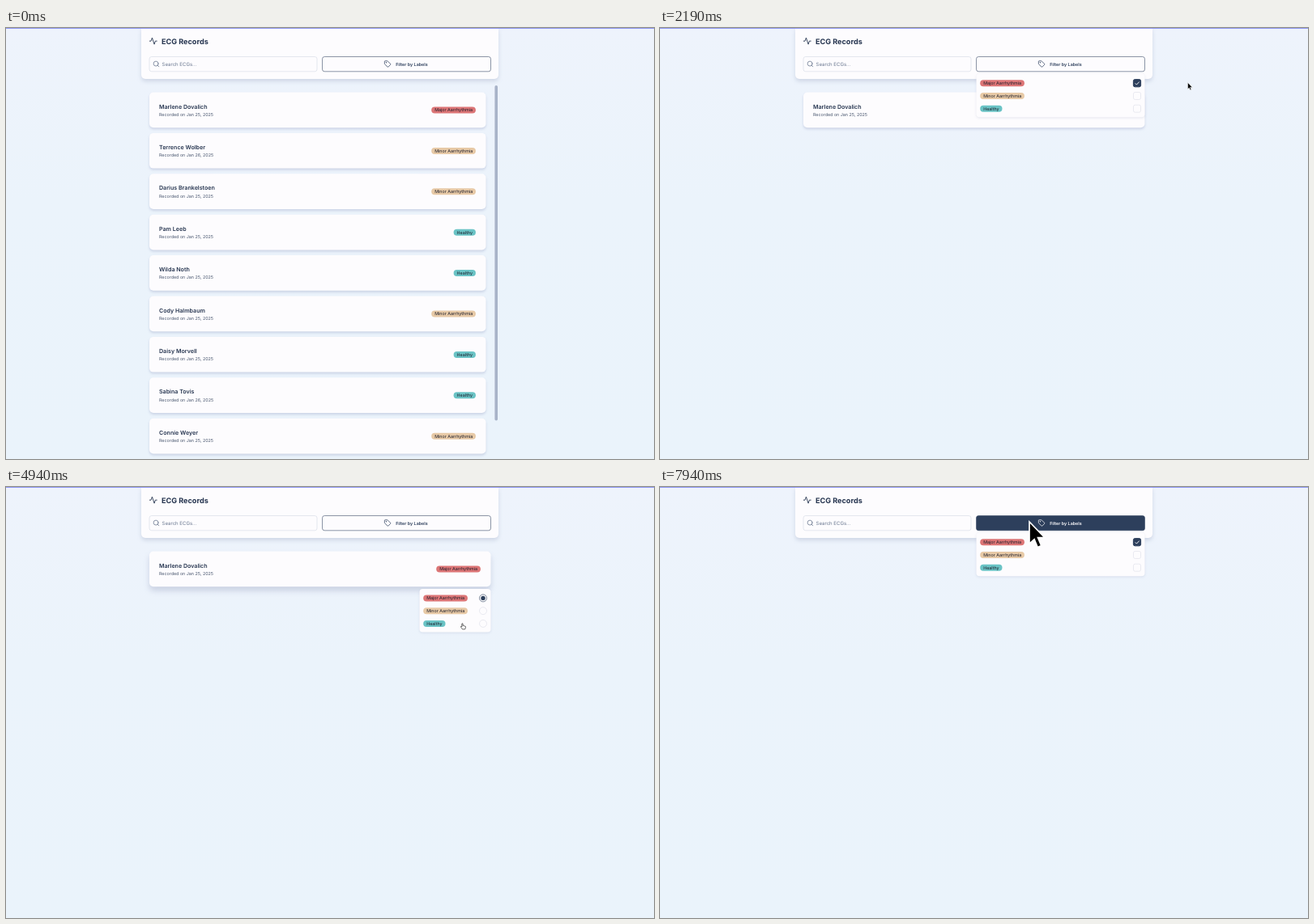
An HTML page that plays this animation: 800 by 533 pixels, repeating every 8000 ms.

```html
<!DOCTYPE html>
<html lang="en">
<head>
<meta charset="utf-8">
<title>ECG Records</title>
<style>
  html, body { margin: 0; width: 100%; height: 100%; overflow: hidden; background: #ebf3fb; }
  svg { display: block; width: 800px; height: 533px; }
  text { font-family: Inter, "Open Sans", sans-serif; text-rendering: geometricPrecision; fill: #25344f; }
  .title { font-size: 9.1px; font-weight: 700; }
  .name { font-size: 7.1px; font-weight: 600; }
  .date { font-size: 5.36px; fill: #48566e; }
  .pill { font-size: 5.36px; fill: #1c1d2a; }
  .hint { font-size: 6.05px; fill: #6b7890; }
  .action { font-size: 5.4px; font-weight: 600; }
  .icon { fill: none; stroke: #25344f; stroke-width: 2; stroke-linecap: round; stroke-linejoin: round; }
  .panel { fill: #fdfcfe; }
  .header { filter: drop-shadow(0 3px 2.6px rgba(80, 95, 140, .19)); }
  .card { filter: drop-shadow(0 2px 1.8px rgba(80, 90, 150, .2)); }
  .card.lifted { filter: drop-shadow(0 5px 3.6px rgba(80, 90, 140, .22)); }
  .menu { filter: drop-shadow(0 1px 1.5px rgba(80, 90, 140, .14)); }
  .box { fill: #fdfcfe; stroke: #dcdee8; stroke-width: .6; }
  .on { fill: #2d3f5c; stroke: #2d3f5c; }
</style>
</head>
<body>
<svg viewBox="0 0 800 533" id="stage"></svg>
<script>
const LOOP = 8000;
const NAVY = [45, 63, 92], LIGHT = [253, 252, 254];
const LABELS = {
  major: { name: "Major Aarrhythmia", width: 54.7, color: "#dc7576" },
  minor: { name: "Minor Aarrhythmia", width: 54.7, color: "#e7c9a6" },
  healthy: { name: "Healthy", width: 27.3, color: "#6ac3c5" }
};
const RECORDS = [
  ["Marlene Dovalich", "Jan 25", "major"], ["Terrence Wolber", "Jan 26", "minor"],
  ["Darius Brankelstoen", "Jan 25", "minor"], ["Pam Leeb", "Jan 25", "healthy"],
  ["Wilda Noth", "Jan 25", "healthy"], ["Cody Halmbaum", "Jan 25", "minor"],
  ["Daisy Morvell", "Jan 25", "healthy"], ["Sabina Tovis", "Jan 26", "healthy"],
  ["Connie Weyer", "Jan 25", "minor"]
];

// Areas that react to the pointer
const SEARCH = { x: 177, y: 35.5, w: 207, h: 18.3 };
const BUTTON = { x: 390.5, y: 35.5, w: 208, h: 18.3 };
const BADGE = { x: 531, y: 97.5, w: 55, h: 8 };
const FILTER_MENU = { x: 390.5, y: 56.8, w: 208, h: 53.5 };
const LABEL_MENU = { x: 510.5, y: 126, w: 88, h: 53.5 };

// Markup helpers
const rect = (x, y, w, h, r, attrs = "") =>
  `<rect x="${x}" y="${y}" width="${w}" height="${h}" rx="${r}" ${attrs}/>`;
const area = (a, r, attrs) => rect(a.x, a.y, a.w, a.h, r, attrs);
const text = (x, y, cls, value) => `<text x="${x}" y="${y}" class="${cls}">${value}</text>`;
const icon = (x, y, size, body, attrs = "") =>
  `<g class="icon" transform="translate(${x} ${y}) scale(${size / 24})" ${attrs}>${body}</g>`;

function pill(key, x, cy) {
  const { name, width, color } = LABELS[key];
  return rect(x, cy - 4, width, 8, 4, `fill="${color}"`) + text(x + 4, cy + 1.95, "pill", name);
}

function card([name, day, key], i, width) {
  const y = 79.5 + 50.4 * i;
  return rect(177, y, width, 43.7, 5, 'class="panel card"') +
    text(189, y + 20.1, "name", name) +
    text(189, y + 29.2, "date", `Recorded on ${day}, 2025`) +
    pill(key, 177 + width - 12.6 - LABELS[key].width, y + 22);
}

function menu(id, a, control) {
  const items = Object.keys(LABELS).map((key, i) => {
    const cy = a.y + 11.4 + 15.75 * i;
    return pill(key, a.x + 4.7, cy) + control(key, cy);
  });
  return `<g id="${id}">${area(a, 4, 'class="panel menu"')}${items.join("")}</g>`;
}

const tick = cy => `<g id="check">${rect(584.4, cy - 4.6, 9.2, 9.2, 2, 'class="on"')}
  <path d="M586.7 ${cy + .2}l1.7 1.7l3.2-3.5" fill="none" stroke="#fff" stroke-width=".9"/></g>`;
const checkbox = (key, cy) =>
  rect(584.5, cy - 4.5, 9, 9, 2, 'class="box"') + (key === "major" ? tick(cy) : "");
const radio = (key, cy) =>
  `<circle cx="589" cy="${cy}" r="4.5" class="box" id="ring-${key}"/>
   <circle cx="589" cy="${cy}" r="2.7" class="on" stroke-width="0" id="dot-${key}"/>`;

const PULSE = `<path d="M22 12h-4l-3 9L9 3l-3 9H2"/>`;
const LENS = `<circle cx="11" cy="11" r="8"/><path d="m21 21-4.3-4.3"/>`;
const TAG = `<path d="M12.6 2.6A2 2 0 0 0 11.2 2H4a2 2 0 0 0-2 2v7.2a2 2 0 0 0 .6 1.4l8.7 8.7a2.4 2.4 0 0 0 3.4 0l6.6-6.6a2.4 2.4 0 0 0 0-3.4z"/><circle cx="7.5" cy="7.5" r=".6"/>`;

document.getElementById("stage").innerHTML = `
  <defs><linearGradient id="sky" x2="0" y2="1">
    <stop stop-color="#eef3fc"/><stop offset=".4" stop-color="#ebf3fb"/><stop offset="1" stop-color="#eaf3fb"/>
  </linearGradient></defs>
  ${rect(0, 0, 800, 533, 0, 'fill="url(#sky)"')}
  <g id="all">${RECORDS.map((r, i) => card(r, i, 415.5)).join("")}
    ${rect(603.4, 71, 3.6, 414.5, 1.8, 'fill="#a8b3c8"')}</g>
  <g id="single">${card(RECORDS[0], 0, 421.5)}</g>
  <path class="panel header" d="M167 0H608V58a5 5 0 0 1-5 5H172a5 5 0 0 1-5-5z"/>
  ${rect(0, 0, 800, .8, 0, 'fill="#7a82f2"')}
  ${icon(176.4, 10.8, 10.7, PULSE)}
  ${text(192, 19.7, "title", "ECG Records")}
  <g id="focus">${rect(176, 34.5, 209, 20.3, 3.6, 'fill="none" stroke="#cfd3de"')}</g>
  ${area(SEARCH, 2.8, 'class="panel" stroke="#d3d8e4" stroke-width=".6"')}
  ${icon(181, 40, 8.93, LENS, 'style="stroke:#66738c"')}
  ${text(192.6, 46.7, "hint", "Search ECGs...")}
  ${rect(192.6, 40.8, .6, 7.4, 0, 'id="caret" fill="#25344f"')}
  <g id="button">
    ${area(BUTTON, 2.8, 'id="face" stroke="#2d3f5c" stroke-width=".55"')}
    ${icon(466.6, 40, 8.93, TAG, 'id="tag"')}
    ${text(481.2, 46.5, "action", "Filter by Labels")}
  </g>
  ${menu("filterMenu", FILTER_MENU, checkbox)}
  ${menu("labelMenu", LABEL_MENU, radio)}
  <g id="cursor">
    <path id="arrow" d="M0 0V16L3.6 12.7L6 18.5L8.7 17.4L6.2 11.6H11.2Z" transform="scale(.5)" fill="#000" stroke="#fff"/>
    <path id="hand" transform="scale(.48) translate(-6.2 -1.2)" fill="#fff" stroke="#111" stroke-width="1.3"
      d="M5 10V2.3a1.2 1.2 0 0 1 2.5 0V7c.4-.9 2.3-.8 2.5.4.5-.8 2.1-.6 2.4.6.8-.6 2 0 2 1.2v2.6c0 2-.8 2.6-1.4 4.2H6.2C5.4 13.6 3.4 12 2.3 10.3c-.8-1.4.8-2.3 1.7-1.3z"/>
    <path id="ibeam" d="M-1.4-3.3Q0-3.3 0-2.3V2.3Q0 3.3-1.4 3.3M1.4-3.3Q0-3.3 0-2.3M0 2.3Q0 3.3 1.4 3.3" fill="none" stroke="#111" stroke-width=".8"/>
  </g>`;

// Pointer trips: each starts where the previous one ended
const TRIPS = [
  { at: 400, lasts: 250, x: 548, y: 47 },
  { at: 880, lasts: 310, x: 563, y: 85.5 },
  { at: 1200, lasts: 260, x: 580, y: 66 },
  { at: 1560, lasts: 460, x: 667, y: 71 },
  { at: 2060, lasts: 500, x: 576.3, y: 51 },
  { at: 2760, lasts: 430, x: 570.6, y: 102.8 },
  { at: 3940, lasts: 1000, x: 563.4, y: 168.8 },
  { at: 5560, lasts: 380, x: 635, y: 151.5 },
  { at: 6120, lasts: 200, x: 360, y: 38 },
  { at: 6500, lasts: 570, x: 323.3, y: 49.5 },
  { at: 7300, lasts: 600, x: 456, y: 43 }
];

const mix = (a, b, k) => a + (b - a) * k;
const blend = (a, b, k) => `rgb(${a.map((v, i) => mix(v, b[i], k)).join()})`;
const smooth = k => k * k * (3 - 2 * k);
const ramp = (t, from, lasts) => Math.min(1, Math.max(0, (t - from) / lasts));
const during = (t, from, to = LOOP) => t >= from && t < to;
const inside = (p, a) => p.x >= a.x && p.x <= a.x + a.w && p.y >= a.y && p.y <= a.y + a.h;
const fade = (t, from, to, rise, fall) => ramp(t, from, rise) - ramp(t, to, fall);

const hoverAt = t => fade(t, 560, 900, 150, 320) + fade(t, 2440, 2820, 150, 180) + fade(t, 7470, LOOP, 150, 1);
const filterMenuAt = t => fade(t, 880, 2760, 90, 120) + fade(t, 7800, LOOP, 90, 1);
const labelMenuAt = t => fade(t, 4020, 5570, 90, 120);

function pressAt(t) {
  const gap = Math.min(...[820, 2630, 7790].map(click => Math.abs(t - click)));
  return 1 - .023 * (1 - ramp(gap, 30, 60));
}

function pointerAt(t) {
  return TRIPS.reduce((p, trip) => {
    const k = smooth(ramp(t, trip.at, trip.lasts));
    return { x: mix(p.x, trip.x, k), y: mix(p.y, trip.y, k) };
  }, { x: 540, y: 150 });
}

function shapeAt(t, p) {
  if (t < 400) return "";
  if (inside(p, SEARCH)) return "ibeam";
  const buttonFree = !during(t, 900, 2480) && t < 7870;
  const clickable = inside(p, BUTTON) && buttonFree ||
    inside(p, BADGE) && during(t, 3400, 4020) ||
    inside(p, FILTER_MENU) && filterMenuAt(t) > 0 ||
    inside(p, LABEL_MENU) && labelMenuAt(t) > 0;
  return clickable ? "hand" : "arrow";
}

const el = Object.fromEntries([...document.querySelectorAll("[id]")].map(node => [node.id, node]));
const buttonText = el.button.querySelector("text");
const singleCard = el.single.querySelector(".card");
const show = (node, on) => { node.style.display = on ? "" : "none"; };
const scaleAbout = (node, x, y, s) =>
  node.setAttribute("transform", `translate(${x * (1 - s)} ${y * (1 - s)}) scale(${s})`);

function drawMenu(node, k, x, y) {
  show(node, k > 0);
  node.setAttribute("opacity", k);
  scaleAbout(node, x, y, mix(.95, 1, k));
}

function render(t) {
  show(el.all, t < 2060);
  show(el.single, during(t, 2060, 5760));
  singleCard.classList.toggle("lifted", during(t, 3000, 5570));

  const focused = during(t, 6560, 7800);
  show(el.focus, focused);
  show(el.caret, focused && (t - 6560) % 1060 < 530);

  const hover = hoverAt(t);
  el.face.style.fill = blend(LIGHT, NAVY, hover);
  el.tag.style.stroke = buttonText.style.fill = blend(NAVY, LIGHT, hover);
  scaleAbout(el.button, 494.5, 44.6, pressAt(t));

  drawMenu(el.filterMenu, filterMenuAt(t), 494.5, FILTER_MENU.y);
  drawMenu(el.labelMenu, labelMenuAt(t), 598.5, LABEL_MENU.y);
  show(el.check, t >= 1500);
  const chosen = t < 5200 ? "major" : "healthy";
  for (const key in LABELS) {
    show(el["dot-" + key], key === chosen);
    el["ring-" + key].style.stroke = key === chosen ? "#2d3f5c" : "";
  }

  const p = pointerAt(t), shape = shapeAt(t, p);
  for (const id of ["arrow", "hand", "ibeam"]) show(el[id], id === shape);
  const size = mix(1, 3.4, ramp(t, 7480, 400));
  el.cursor.setAttribute("transform", `translate(${p.x} ${p.y}) scale(${size})`);
}

const start = performance.now();
function frame() {
  render((performance.now() - start) % LOOP);
  requestAnimationFrame(frame);
}
frame();
</script>
</body>
</html>
```
